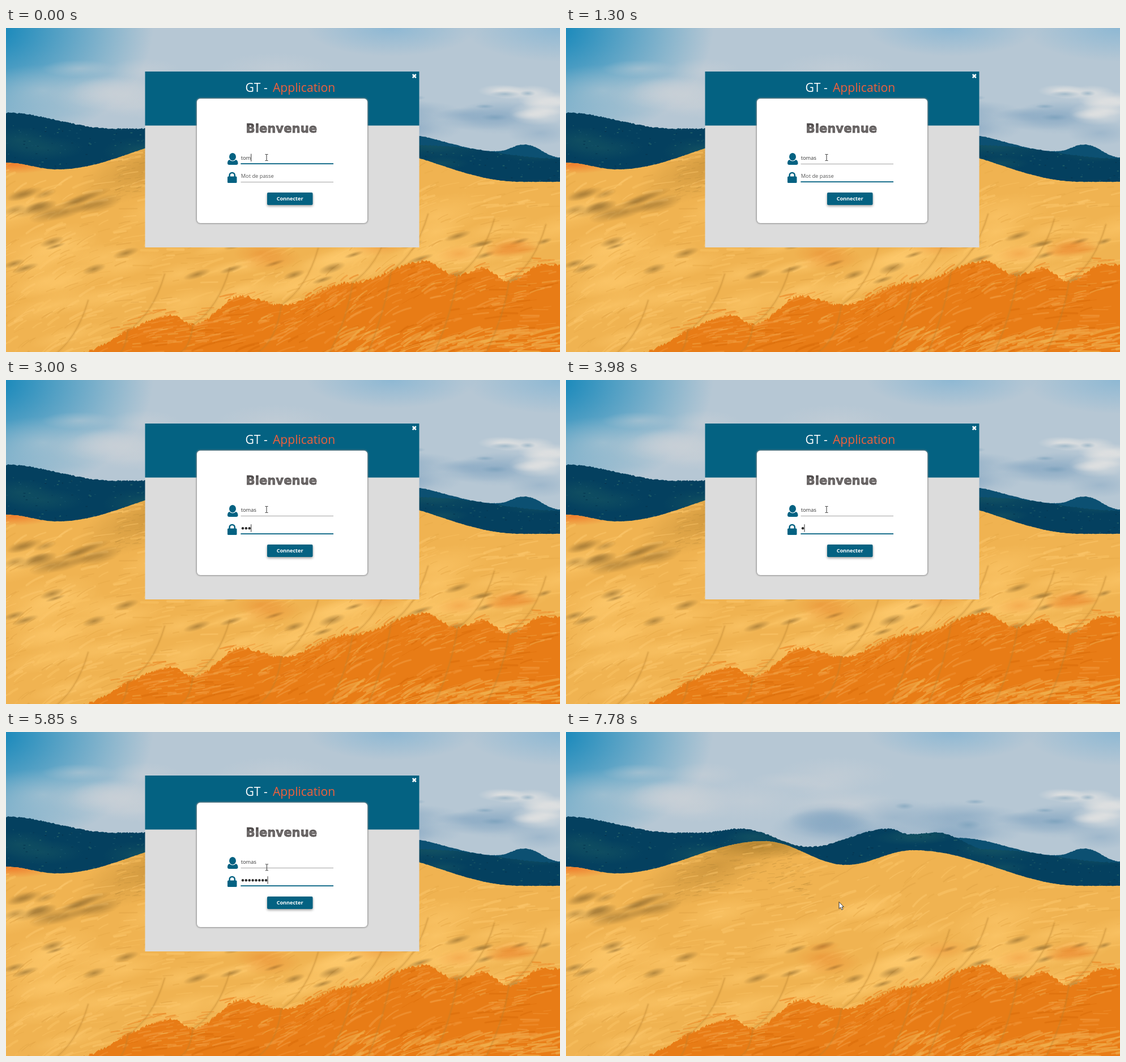
Recreate the animation shown at these times as an HTML page with a canvas. Size 978 by 573 pixels, loop 8000 ms.

```html
<!DOCTYPE html>
<html lang="fr">
<head>
<meta charset="utf-8">
<title>Connexion</title>
<style>
html, body { margin: 0; width: 100%; height: 100%; overflow: hidden; background: #f0b04e; }
canvas, svg { position: absolute; left: 0; top: 0; width: 978px; height: 573px; }
text { font-family: "Open Sans", "Noto Sans", sans-serif; }
.title { font-size: 21.1px; }
.welcome { font: bold 21.2px "DejaVu Sans", sans-serif; fill: url(#metal); stroke: #5c5858; stroke-width: .8; }
.field { font-size: 9.3px; fill: #333; }
.button { font-size: 9.1px; font-weight: 700; fill: #fff; }
.card { filter: drop-shadow(0 0 1.5px #808080) drop-shadow(0 0 1px #999); }
</style>
</head>
<body>
<canvas id="scene" width="978" height="573"></canvas>
<svg viewBox="0 0 978 573">
  <defs>
    <linearGradient id="metal" x1="0" y1="0" x2="0" y2="1">
      <stop offset=".25" stop-color="#4b4747"/>
      <stop offset=".5" stop-color="#777373"/>
      <stop offset=".85" stop-color="#5c5858"/>
    </linearGradient>
    <clipPath id="buttonShape"><rect x="461" y="291" width="80.5" height="22" rx="2"/></clipPath>
  </defs>
  <g id="panel">
    <rect x="245.5" y="77" width="484" height="311" fill="#dcdcdc"/>
    <rect x="245.5" y="77" width="484" height="95.5" fill="#046282"/>
    <path d="M717.8 82l6 6m0-6l-6 6" stroke="#fff" stroke-width="2.5"/>
    <text class="title" x="422.5" y="113" fill="#fff">GT -</text>
    <text class="title" x="471" y="113" fill="#f0603c">Application</text>
    <rect class="card" x="337" y="125" width="301" height="220" rx="6" fill="#fff"/>
    <text class="welcome" x="423.5" y="185">Bienvenue</text>

    <g fill="#046282">
      <ellipse cx="400" cy="227.8" rx="6" ry="6.8"/>
      <path d="M394.5 233C391.6 234 391 237 391 239.3Q391 242 394 242H406.5Q409.5 242 409.5 239.3C409.5 237 408.8 234 405.8 233Q400 238 394.5 233Z"/>
      <rect x="391" y="262.5" width="16.5" height="11.5" rx="1.5"/>
      <path d="M394.6 263V260.5a4.6 4.6 0 0 1 9.2 0V263" fill="none" stroke="#046282" stroke-width="2.5"/>
    </g>

    <path d="M414.5 240.5H578M414.5 272.5H578" stroke="#a4a4a4"/>
    <rect id="userLine" y="239.2" height="1.8" fill="#046282"/>
    <rect id="passLine" y="271.2" height="1.8" fill="#046282"/>
    <text id="user" class="field" x="414.7" y="232.5"></text>
    <text id="hint" class="field" x="414.7" y="265" style="fill:#555">Mot de passe</text>
    <g id="dots" fill="#2e2e2e"></g>
    <rect id="caret" width="1" height="13.5" fill="#333"/>

    <rect id="button" x="461" y="291" width="80.5" height="22" rx="2" fill="#046282"/>
    <text class="button" x="477.7" y="305">Connecter</text>
    <g id="ripple" clip-path="url(#buttonShape)" fill="#fff">
      <rect x="461" y="291" width="81" height="22" opacity=".04"/>
      <circle id="wave" cx="482" cy="306" opacity=".32"/>
    </g>
  </g>
  <path id="beam" d="M-2.5-5.5H-.5L0-5L.5-5.5H2.5M0-5V5M-2.5 5.5H-.5L0 5L.5 5.5H2.5" fill="none" stroke="#333"/>
  <path id="arrow" d="M0 0V12L2.7 9.5L4.7 14L6.8 13L4.9 8.8H8.4Z" fill="#fff" stroke="#222" stroke-width=".9"/>
</svg>
<script>
const W = 978, H = 573, LOOP = 8000;
const $ = id => document.getElementById(id);

// ---- Landscape ----
const ctx = $('scene').getContext('2d');
let seed = 41;
const rnd = () => (seed = (seed * 16807) % 2147483647) / 2147483647;
const between = (a, b) => a + (b - a) * rnd();
const pick = list => list[Math.floor(rnd() * list.length)];

// Height of a skyline that eases from each peak to the next valley.
function ridge(text) {
  const pts = text.split(' ').map(p => p.split(',').map(Number));
  return x => {
    const i = Math.max(1, pts.findIndex(p => p[0] >= x));
    const [x0, y0] = pts[i - 1], [x1, y1] = pts[i];
    return y0 + (y1 - y0) * (1 - Math.cos(Math.PI * (x - x0) / (x1 - x0))) / 2;
  };
}
const hills = ridge('0,150 190,178 240,178 308,171 430,203 570,171 607,181 655,178 745,208 978,231');
const farHills = ridge('0,260 690,187 868,218 915,206 978,229');
const dunes = ridge('0,238 90,250 350,193 495,235 612,209 910,272 978,272');
const rust = ridge('0,600 110,578 295,508 330,525 415,474 486,490 610,450 740,413 797,438 840,425 888,448 945,419 978,419');

function land(height, rough) {
  const p = new Path2D();
  for (let x = 0; x <= W; x += 2) p.lineTo(x, height(x) + between(-rough, rough));
  p.lineTo(W, H);
  p.lineTo(0, H);
  return p;
}
function inside(path, color, paint) {
  ctx.save();
  ctx.fillStyle = color;
  ctx.fill(path);
  ctx.clip(path);
  paint();
  ctx.restore();
}

function glow(x, y, rx, ry, rgb, alpha, turn = 0) {
  ctx.save();
  ctx.translate(x, y); ctx.rotate(turn); ctx.scale(rx, ry);
  const g = ctx.createRadialGradient(0, 0, 0, 0, 0, 1);
  g.addColorStop(0, `rgba(${rgb},${alpha})`);
  g.addColorStop(1, `rgba(${rgb},0)`);
  ctx.fillStyle = g;
  ctx.fillRect(-1, -1, 2, 2);
  ctx.restore();
}
// Soft random patches in the box x..x+w, y..y+h
function patches(count, x, y, w, h, size, rgb, alpha, turn = 0) {
  for (let i = 0; i < count; i++) {
    const r = between(size * .5, size);
    glow(between(x, x + w), between(y, y + h), r, r * between(.2, .4), rgb, alpha, turn);
  }
}

// Brush strokes down the slope, starting up to `depth` below a skyline.
const lean = x => .15 + .4 * Math.cos(x / 200) ** 2;
function strokes(count, height, depth, colors, alpha, length, thick, left = 0, right = W) {
  ctx.globalAlpha = alpha;
  ctx.lineCap = 'round';
  for (let i = 0; i < count; i++) {
    const x = between(left, right), y = height(x) + between(0, depth);
    const a = lean(x) + between(-.2, .2), len = between(length * .3, length);
    const dx = -Math.cos(a) * len, dy = Math.sin(a) * len;
    ctx.strokeStyle = pick(colors);
    ctx.lineWidth = between(.7, thick);
    ctx.beginPath();
    ctx.moveTo(x, y);
    ctx.quadraticCurveTo(x + dx * .5, y + dy * .3, x + dx, y + dy);
    ctx.stroke();
  }
  ctx.globalAlpha = 1;
}

function drawSky() {
  ctx.fillStyle = '#b6c7d4';
  ctx.fillRect(0, 0, W, H);
  glow(-30, 0, 290, 210, '12,132,185', 1);
  glow(680, 0, 150, 50, '125,178,211', .7);
  glow(978, 0, 170, 60, '125,178,211', .7);
  patches(14, 60, 60, 440, 80, 120, '203,209,215', .45);
  patches(22, 440, 145, 538, 50, 100, '135,168,195', .5);
  patches(9, 870, 110, 108, 45, 60, '224,225,225', .85);
  patches(7, 450, 115, 500, 50, 28, '110,153,182', .5);
}

function drawMountains() {
  inside(land(farHills, .5), '#0c5072', () => {});
  inside(land(hills, 1), '#04405f', () => {
    patches(18, 0, 180, W, 70, 90, '22,85,98', .6);
    for (let i = 0; i < 450; i++) {
      ctx.fillStyle = pick(['#124f68', '#205d67', '#063651']);
      ctx.fillRect(between(0, W), between(172, 270), between(1, 4), between(1, 2));
    }
  });
}

function drawRust() {
  inside(land(rust, 3), '#e87c16', () => {
    strokes(420, rust, 160, ['#f0902f', '#f2993c', '#dd6e0a'], .6, 42, 4, 130, W + 40);
    strokes(200, rust, 45, ['#f0a94a', '#f19a3c'], .5, 26, 3, 130, W + 30);
    strokes(150, () => 528, 50, ['#f1af4d', '#f0a344'], .6, 50, 5, 600, W + 40);
  });
  strokes(110, x => rust(Math.min(x, W)) - 16, 24, ['#ea821f', '#ee9434'], .55, 26, 3, 180, W);
}

// Gullies run down into each dip of the rust layer.
function drawGullies() {
  ctx.strokeStyle = '#b97f30';
  for (const x of [80, 215, 330, 486, 612, 680, 797, 888]) {
    const y = rust(x);
    for (const [width, alpha] of [[5, .14], [1, .45]]) {
      ctx.globalAlpha = alpha;
      ctx.lineWidth = width;
      ctx.beginPath();
      ctx.moveTo(x + 65, y - 100);
      ctx.quadraticCurveTo(x + 45, y - 30, x, y);
      ctx.quadraticCurveTo(x - 8, y + 60, x - 40, H);
      ctx.stroke();
    }
  }
  ctx.globalAlpha = 1;
}

function drawDunes() {
  inside(land(dunes, .3), '#f0b351', () => {
    glow(10, 240, 80, 18, '239,125,45', 1);
    patches(60, 0, 290, W, 280, 100, '255,203,110', .55, -.25);
    glow(335, 200, 130, 26, '165,122,42', .9);
    glow(260, 240, 150, 50, '196,142,55', .7, -.4);
    strokes(480, dunes, 330, ['#fdc86d', '#fbc364'], .45, 42, 5, 0, W + 40);
    strokes(380, dunes, 330, ['#dda044', '#e5a646'], .45, 34, 2.5, 0, W + 40);
    strokes(220, dunes, 75, ['#b98a39', '#cf9944'], .4, 14, 1.6, 200, 440);
    patches(14, 0, 290, 170, 40, 40, '139,102,43', .45, -.3);
    patches(26, 0, 365, W, 85, 26, '139,102,43', .6, -.3);
    patches(10, 430, 370, 500, 50, 55, '231,126,37', .35, -.1);
    drawRust();
    drawGullies();
  });
}
drawSky();
drawMountains();
drawDunes();

// ---- Login ----
const NAME = 'tomas', DOT_GAP = 5.87;
for (let i = 0; i < 8; i++)
  $('dots').innerHTML += `<circle cx="${418 + i * DOT_GAP}" cy="262.3" r="2.2"/>`;

// Moments of each keystroke
const letterKeys = [150, 280];
const dotKeys = [1830, 1830, 2150, 2290, 3980, 4130, 4400, 4530, 4840, 4980, 5290, 5420];
const eraseKeys = [3000, 3120, 3240, 3390];
const past = (keys, t) => keys.filter(k => k <= t).length;
const within = (t, from, to) => t >= from && t < to;

const set = (id, attrs) => { for (const k in attrs) $(id).setAttribute(k, attrs[k]); };
const show = (id, on) => { $(id).style.display = on ? '' : 'none'; };
const line = (id, part) => set(id, { x: 496.2 - 81.8 * part, width: 163.6 * part });

function drawFields(t) {
  const dots = past(dotKeys, t) - past(eraseKeys, t);
  const onUser = t < 750;
  $('user').textContent = NAME.slice(0, 3 + past(letterKeys, t));
  show('hint', !dots);
  [...$('dots').children].forEach((dot, i) => { dot.style.display = i < dots ? '' : 'none'; });
  line('userLine', onUser ? 1 : 0);
  line('passLine', within(t, 900, 6670) ? (t < 1020 ? .75 : 1) : 0);

  show('caret', !within(t, 1300, 1830) && !within(t, 2720, 3000) && t < 6390);
  set('caret', onUser
    ? { x: 414.7 + $('user').getComputedTextLength(), y: 222.5 }
    : { x: 414.6 + dots * DOT_GAP, y: 255.2 });
}

function drawButton(t) {
  const press = t < 6670 ? 0 : t < 6800 ? .45 : 1;
  show('ripple', press);
  set('wave', { r: 35.5 * press });
  $('button').style.filter =
    `drop-shadow(0 ${2 + 2 * press}px ${2 + 2.5 * press}px rgba(0,0,0,${.4 + .1 * press}))`;
}

// The pointer slides to the button in five hops.
function drawPointer(t) {
  const hop = Math.max(0, Math.min(5, Math.floor((t - 5850) / 135) + 1));
  const p = (hop / 5) ** 1.2, shape = hop < 3 ? 'beam' : 'arrow';
  for (const id of ['beam', 'arrow']) show(id, id === shape);
  set(shape, { transform: `translate(${460 + 22 * p * p} ${229 + 71.5 * p})` });
}

function render(t) {
  show('panel', t < 7780);
  drawFields(t);
  drawButton(t);
  drawPointer(t);
}

const start = performance.now();
function tick() {
  render((performance.now() - start) % LOOP);
  requestAnimationFrame(tick);
}
tick();
</script>
</body>
</html>
```
